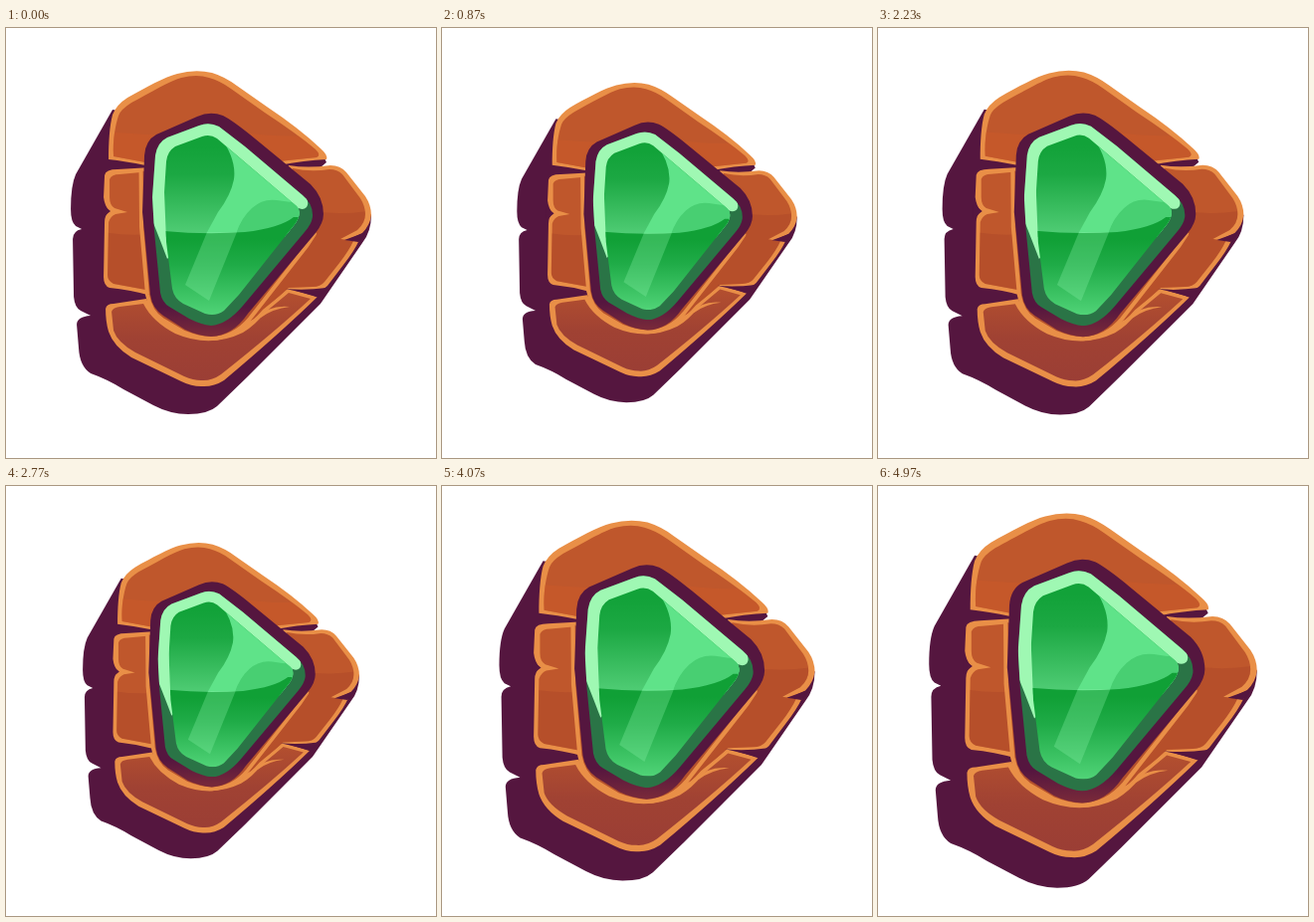
An HTML page that plays this animation: 432 by 432 pixels, repeating every 5.01 s.

```html
<!DOCTYPE html>
<html lang="en">
<head>
<meta charset="utf-8">
<title>Gem button</title>
<style>
  html, body { margin: 0; width: 100%; height: 100%; overflow: hidden; background: #fff; }
  svg { display: block; width: 100vw; height: 100vh; }
  .dark { fill: #55163f; }
  .rim { fill: #e98f47; }
  .wood { fill: #bf572c; }
  .shade { fill: #a8452a; opacity: .4; }
  .glow { fill: #cb5b29; opacity: .5; }
</style>
</head>
<body>
<svg viewBox="0 0 432 432">
  <defs>
    <linearGradient id="low" x1="0" y1="0" x2="0" y2="1">
      <stop offset="0" stop-color="#b34f2f"/><stop offset=".5" stop-color="#a04233"/><stop offset="1" stop-color="#9b3e35"/>
    </linearGradient>
    <linearGradient id="socket" gradientUnits="userSpaceOnUse" x1="0" y1="280" x2="0" y2="308">
      <stop offset="0" stop-color="#55163f"/><stop offset="1" stop-color="#78293a"/>
    </linearGradient>
    <linearGradient id="upper" gradientUnits="userSpaceOnUse" x1="0" y1="108" x2="0" y2="206">
      <stop offset=".1" stop-color="#12a239"/><stop offset=".4" stop-color="#1ca843"/><stop offset="1" stop-color="#4fcc74"/>
    </linearGradient>
    <linearGradient id="lower" gradientUnits="userSpaceOnUse" x1="0" y1="204" x2="0" y2="288">
      <stop offset=".1" stop-color="#10a036"/><stop offset=".4" stop-color="#1fab47"/><stop offset="1" stop-color="#50d377"/>
    </linearGradient>
    <clipPath id="gem"><path d="M147 170L150 128Q152 115 162 110L194 98Q204 94 214 99L240 119L298 168Q309 177 308 190Q307 197 300 205L238 279Q222 298 206 299Q196 298 184 292L164 280Q157 276 155 266L149 205Z"/></clipPath>
    <clipPath id="face"><path d="M159 165L161 134Q162 124 170 119L197 109Q205 106 212 111L292 179Q298 185 291 196L234 268L219 284Q211 290 200 287L178 277Q169 272 167 262L161 215Z"/></clipPath>
    <clipPath id="top"><path id="topIn" d="M108 129C107 112 110 97 113 88Q115 82 126 75C145 65 165 53 176 50Q192 46 204 50Q215 53 226 61L260 85Q292 106 311 122Q317 128 312 130L274 134L220 120L140 135Z"/></clipPath>
    <clipPath id="left"><path id="leftIn" d="M104 152Q106 147 114 147L146 144L146 264L108 257Q102 254 102 248L103 195Q105 189 110 187L122 185L109 181Q104 178 104 170Z"/></clipPath>
    <clipPath id="right"><path id="rightIn" d="M288 141Q306 145 325 142Q333 142 338 147L356 171Q361 179 361 187Q361 196 353 203L336 212L349 214Q345 223 335 236L320 255Q316 260 308 260L284 261L250 292L215 308L240 260Z"/></clipPath>
  </defs>
  <g id="badge">
    <path class="dark" d="M107 82L70 147Q65 158 65 182Q65 195 70 199L76 202Q67 204 67 212L68 270Q69 281 75 284L85 289Q71 290 71 298L73 322Q74 340 85 347Q102 353 118 363L148 379Q165 388 183 388Q203 388 212 380L242 351L316 277L358 216Q367 205 367 188L340 150L316 140L322 135L316 122Z"/>

    <path class="rim" d="M103 132C103 115 104 98 107 87Q111 77 122 70C140 60 160 49 172 46Q190 41 207 45Q220 49 232 58L262 79Q295 101 316 121Q324 128 322 132Q300 133 274 138L220 120L140 138Q120 134 103 132Z"/>
    <use href="#topIn" class="wood"/>
    <path class="glow" clip-path="url(#top)" d="M100 104Q170 111 232 104Q270 110 300 108L330 145H100Z"/>

    <path class="rim" d="M99 148Q100 142 112 142L146 140L146 269Q125 263 104 261Q98 259 98 250L99 195Q99 188 104 184Q99 179 98 170Z"/>
    <use href="#leftIn" class="wood"/>
    <path class="shade" clip-path="url(#left)" d="M98 205Q120 209 146 207V270H98Z"/>
    <path class="dark" d="M96 177L105 184L96 191Z"/>

    <path class="rim" d="M284 138Q303 141 326 138Q336 138 342 145L361 169Q367 178 367 188Q366 198 358 206L345 212L355 213Q350 224 339 238L323 259Q318 264 310 264L285 264L250 296L215 310L240 260Z"/>
    <use href="#rightIn" class="wood"/>
    <path class="shade" clip-path="url(#right)" d="M300 183Q335 189 368 183V320H200V230Z"/>
    <path class="dark" d="M340 213L362 205L354 215Z"/>

    <path class="rim" d="M100 282Q101 277 108 277L141 272Q148 290 172 303Q205 317 234 303Q248 295 258 283L284 262L313 270Q274 308 219 354Q208 361 196 360Q186 360 176 355L126 331Q108 320 103 305Q100 295 100 282Z"/>
    <path fill="url(#low)" d="M106 285Q107 281 114 280L138 277Q147 295 170 307Q205 322 238 306Q250 299 260 286L284 266L306 272Q268 307 216 348Q206 355 196 354Q188 354 179 350L130 326Q112 316 108 304Z"/>
    <path class="rim" d="M250 292Q264 278 285 280Q268 282 256 291Z"/>
    <path class="dark" d="M281 262Q300 264 322 261L314 271Q300 266 281 262Z"/>

    <path fill="#b5512c" stroke="#e98f47" stroke-width="4" stroke-linecap="round" d="M135.5 143L136 200L142 268Q145 285 157 293L179 306Q194 312 206 312Q229 311 245 292L302 219L310 207"/>
    <path fill="url(#socket)" d="M137 185L139 128Q140 113 151 107L192 89Q205 83 218 88Q228 93 250 111L306 157Q319 170 319 187Q319 196 311 206L243 287Q228 309 206 310Q192 309 180 303L158 289Q147 282 145 268L139 205Z"/>

    <g clip-path="url(#gem)">
      <path fill="#2a7446" d="M140 90H320V310H140Z"/>
      <path fill="#9ff8b3" d="M140 190L148 196Q156 216 162 232L200 190L288 177Q297 185 302 180Q305 176 301 169L210 90H140Z"/>
    </g>
    <g clip-path="url(#face)">
      <path fill="url(#upper)" d="M150 100H310V210H150Z"/>
      <path fill="#5fe389" d="M212 105Q232 130 229 152Q226 168 213 185L201 207H310V105Z"/>
      <path fill="#48cf72" d="M231 207Q236 191 247 181Q258 171 272 173Q288 176 310 176V207Z"/>
      <path fill="url(#lower)" d="M150 203Q195 208 240 205Q275 201 289 190L310 190V300H150Z"/>
      <path fill="#8df0aa" opacity=".3" d="M202 205L232 205L204 274L180 258Z"/>
    </g>
  </g>
</svg>
<script>
  const badge = document.getElementById('badge');
  const LOOP = 5010, LAST = 149, MID = 216;
  // Steps at which the pulse is largest; it shrinks evenly on both sides.
  const peaks = [5.1, 33.4, 62, 90.8, 118.6, 147];
  const MAX = 1.15, RATE = 0.0295;

  function stepAt(ms) {
    const tick = Math.floor(ms / 10) * 10;
    return Math.min(LAST, Math.floor((tick + 4) * 0.03));
  }

  function scaleAt(step) {
    const gap = Math.min(...peaks.map(p => Math.abs(step - p)));
    return MAX - RATE * gap;
  }

  function draw(ms) {
    const s = scaleAt(stepAt(ms % LOOP));
    badge.setAttribute('transform', `translate(${MID} ${MID}) scale(${s}) translate(${-MID} ${-MID})`);
  }

  const start = performance.now();
  function loop() {
    draw(performance.now() - start);
    requestAnimationFrame(loop);
  }
  loop();
</script>
</body>
</html>
```
